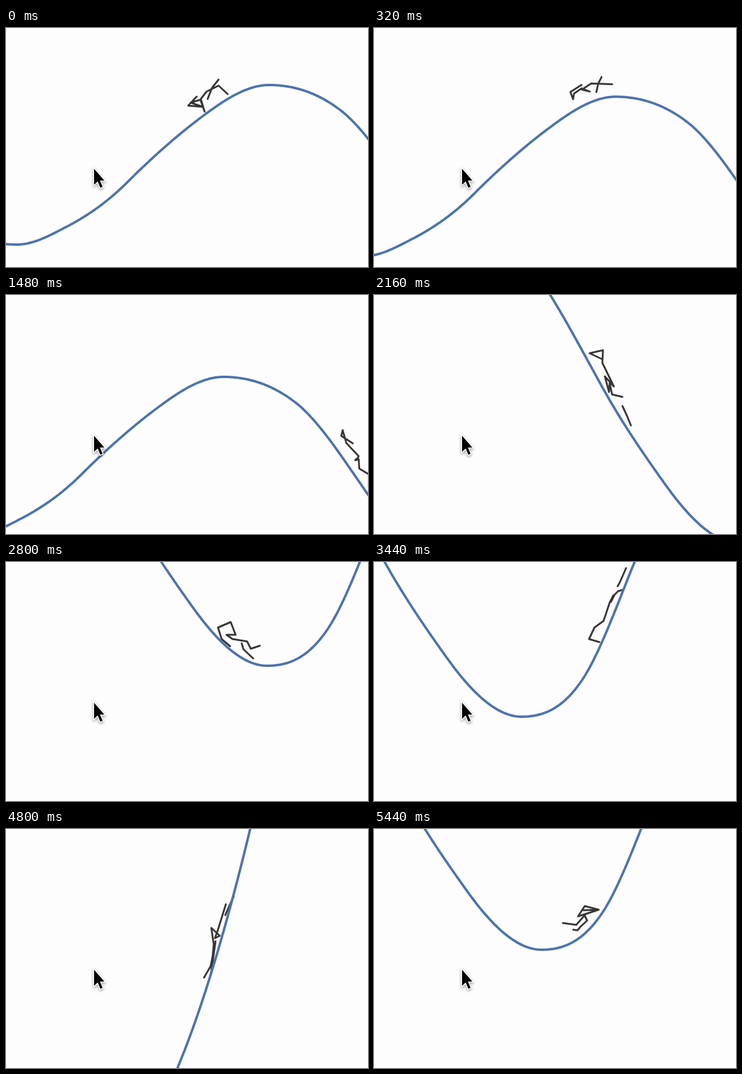
An HTML page with a canvas for the animation above (5.48 s loop, 596 px wide and 394 px high).

```html
<!DOCTYPE html>
<html lang="en">
<head>
<meta charset="utf-8">
<title>Hill rider</title>
<style>
  html, body { margin: 0; width: 100%; height: 100%; overflow: hidden; background: #fdfdfd; }
  canvas { display: block; }
</style>
</head>
<body>
<canvas id="stage" width="596" height="394"></canvas>
<script>
const ctx = document.getElementById('stage').getContext('2d');
const LOOP = 5480, STEP = 40;

// Knots of the hill: x, y, slope
const hill = [
  [-60, 335, .7], [18, 357, 0], [100, 327.5, -.52], [200, 254, -1], [327, 143, -.74],
  [433, 94, 0], [550, 135, .76], [671, 288, 1.43], [777, 470, 1.82], [885, 638, 1.4],
  [1008, 735, 0], [1108, 674, -1.5], [1194, 480, -2.45], [1310, 95, -4.15], [1355, -105, -4.6]
];

// Time and place of the rider's contact with the hill
const ride = [
  [0, 333], [680, 462], [1640, 676], [2160, 786], [2800, 948],
  [3440, 1164], [4200, 1277], [4800, 1259], [5440, 1086]
];

// Camera runs as time, x, y; it holds after each run and cuts to the next
const cameraRuns = [
  [[0, 0, 0], [680, 75, -41]],
  [[1800, 335, 195], [2160, 405, 325], [2800, 578, 564], [3440, 765, 480], [3680, 806, 399]],
  [[4000, 890, 125], [4300, 909, 35], [4800, 908, 95], [5440, 732, 536]]
];

// Key poses on screen: body chain and loose limb
const poses = [
  [0, '314,113 300,128 324,130 304,123 321,118 327,138 320,118 330,105 350,95 365,109',
    '350,85 339,99 332,117'],
  [680, '386,104 363,104 340,110 364,116 378,105 408,109 378,110 398,111 403,122 435,121',
    '409,111 407,122 406,135'],
  [2160, '376,106 355,96 377,91 376,112 395,151 380,134 387,160 388,145 392,164 409,168',
    '409,183 416,198 423,215'],
  [2800, '369,139 355,127 349,108 370,99 378,120 363,120 373,127 397,131 403,143 418,138',
    '388,134 391,144 407,159'],
  [3440, '371,132 354,127 363,108 378,97 388,67 394,55 390,66 396,54 402,48 409,46',
    '401,40 405,33 415,10'],
  [4800, '326,245 337,226 345,185 338,235 342,190 338,163 352,176 344,180 349,166 362,124',
    '361,142 368,126 375,111'],
  [5440, '345,134 370,133 347,127 336,144 370,133 346,141 351,151 341,160 335,167 328,166',
    '348,141 333,158 311,155']
].map(([time, ...chains]) => {
  const [cx, cy] = cameraAt(time), { x, y, angle } = contactAt(time);
  const toLocal = pair => {
    const [px, py] = pair.split(',').map(Number);
    return rotate(px + cx - x, py + cy - y, -angle);
  };
  return { time, chains: chains.map(c => c.split(' ').map(toLocal)) };
});

function rotate(x, y, a) {
  const c = Math.cos(a), s = Math.sin(a);
  return [x * c - y * s, x * s + y * c];
}

function hermite(a, b, ma, mb, span, u) {
  const w = u * u * (3 - 2 * u), v = 1 - u;
  return a + (b - a) * w + span * u * v * (ma * v - mb * u);
}

// The pair of keys around v, and how far v lies between them
function locate(keys, v) {
  let i = 0;
  while (i < keys.length - 2 && keys[i + 1][0] <= v) i++;
  const span = keys[i + 1][0] - keys[i][0];
  return { i, span, u: Math.min(1, Math.max(0, (v - keys[i][0]) / span)) };
}

// Smooth motion through timed keys
function follow(keys, t) {
  const { i, span, u } = locate(keys, t);
  const speed = (j, c) => {
    const p = keys[Math.max(j - 1, 0)], n = keys[Math.min(j + 1, keys.length - 1)];
    return (n[c] - p[c]) / (n[0] - p[0]);
  };
  return keys[i].slice(1).map((v, k) =>
    hermite(v, keys[i + 1][k + 1], speed(i, k + 1), speed(i + 1, k + 1), span, u));
}

function cameraAt(t) {
  return follow(cameraRuns.filter(run => run[0][0] <= t).pop(), t);
}

function hillY(x) {
  const { i, span, u } = locate(hill, x);
  const [, ya, ma] = hill[i], [, yb, mb] = hill[i + 1];
  return hermite(ya, yb, ma, mb, span, u);
}

function contactAt(t) {
  const [x] = follow(ride, t);
  return { x, y: hillY(x), angle: Math.atan2(hillY(x + 1) - hillY(x - 1), 2) };
}

const ground = new Path2D();
for (let x = hill[0][0]; x <= hill[hill.length - 1][0]; x += 2) ground.lineTo(x, hillY(x));

const arrow = new Path2D('M145 232V258.5L151 253L155.3 263.3L159 261.8L154.7 251.5H162Z');

function drawRider(t) {
  const { i, u } = locate(poses.map(p => [p.time]), t);
  const { x, y, angle } = contactAt(t);
  ctx.save();
  ctx.translate(x, y);
  ctx.rotate(angle);
  ctx.beginPath();
  poses[i].chains.forEach((chain, c) => chain.forEach((p, k) => {
    const q = poses[i + 1].chains[c][k];
    const point = p.map((v, d) => v + (q[d] - v) * u);
    k ? ctx.lineTo(...point) : ctx.moveTo(...point);
  }));
  ctx.strokeStyle = '#363636';
  ctx.lineWidth = 3;
  ctx.stroke();
  ctx.restore();
}

function drawCursor() {
  ctx.save();
  ctx.shadowColor = 'rgba(0,0,0,.4)';
  ctx.shadowBlur = 4;
  ctx.shadowOffsetY = 2;
  ctx.strokeStyle = '#fff';
  ctx.lineWidth = 3;
  ctx.stroke(arrow);
  ctx.restore();
  ctx.fillStyle = '#000';
  ctx.fill(arrow);
}

function draw(t) {
  const [cx, cy] = cameraAt(t);
  ctx.fillStyle = '#fdfdfd';
  ctx.fillRect(0, 0, 596, 394);
  ctx.save();
  ctx.translate(-cx, -cy);
  ctx.lineJoin = ctx.lineCap = 'round';
  drawRider(t);
  ctx.strokeStyle = '#4d73ae';
  ctx.lineWidth = 4;
  ctx.stroke(ground);
  ctx.restore();
  drawCursor();
}

const start = performance.now();
function tick() {
  const t = (performance.now() - start) % LOOP;
  draw(Math.floor(t / STEP) * STEP);
  requestAnimationFrame(tick);
}
tick();
</script>
</body>
</html>
```
